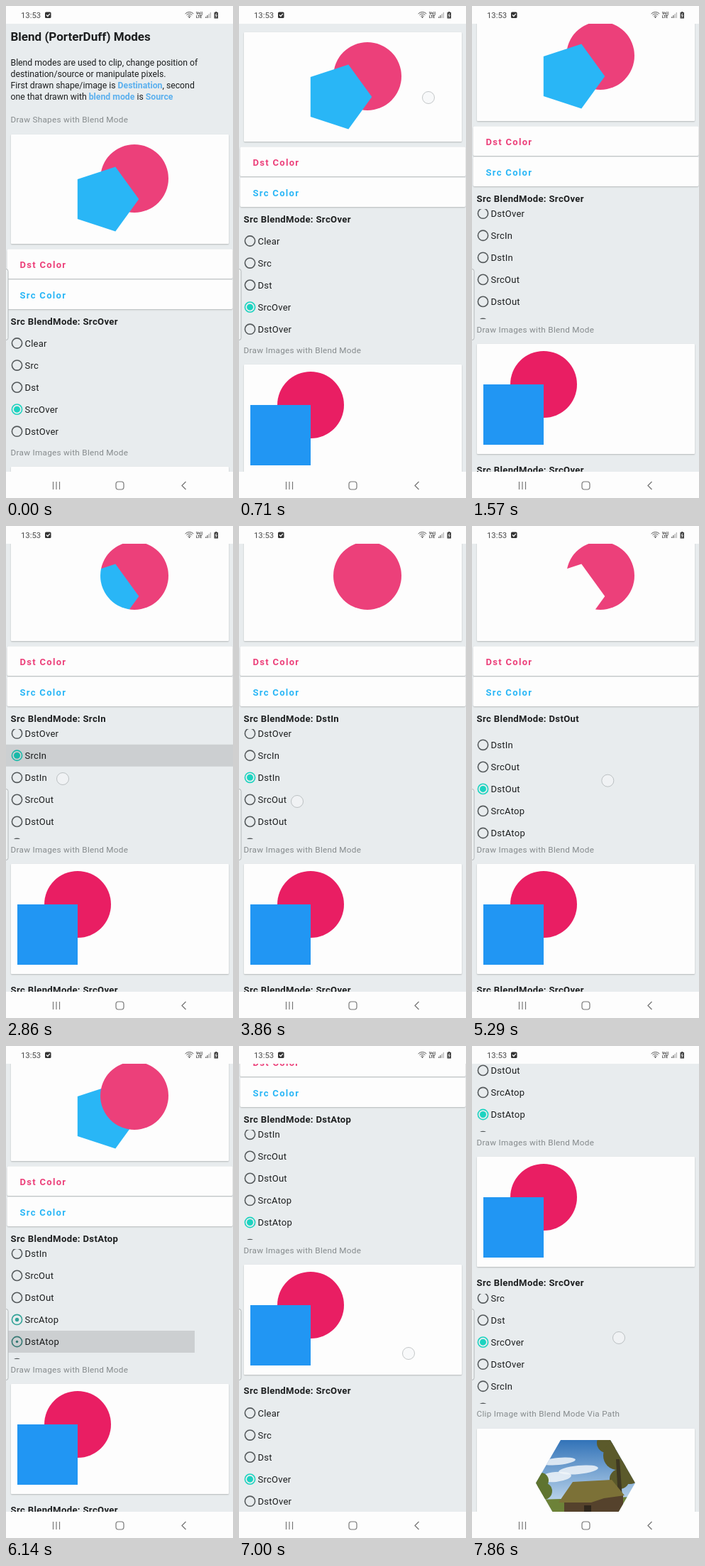
An HTML page with a canvas for the animation above (8 s loop, 320 by 693 pixels).

```html
<!DOCTYPE html>
<html>
<head>
<meta charset="utf-8">
<style>
html, body { margin: 0; width: 100%; height: 100%; overflow: hidden; background: #fff; }
canvas { display: block; width: 320px; height: 693px; }
</style>
</head>
<body>
<canvas id="stage" width="320" height="693"></canvas>
<script>
const ctx = document.getElementById('stage').getContext('2d');
const layer = document.createElement('canvas');
layer.width = 320;
layer.height = 160;
const lctx = layer.getContext('2d');

const LOOP = 8000, FPS = 7;
const INK = '#1c1e1f', PINK = '#ec407a', BLUE = '#29b6f6', LINK = '#5cb0ee';
const MODES = ['Clear', 'Src', 'Dst', 'SrcOver', 'DstOver', 'SrcIn', 'DstIn', 'SrcOut',
  'DstOut', 'SrcAtop', 'DstAtop', 'Xor'];
// Blending only reaches pixels covered by the pentagon.
const COMPOSITE = { SrcOver: 'source-over', SrcIn: 'source-atop', SrcOut: 'xor',
  DstOut: 'destination-out', SrcAtop: 'source-atop', DstAtop: 'destination-over' };

// Keys are in ticks of 1/7 s.
const PAGE_SCROLL = [[3, 0], [4, 58], [5, 144], [6, 170], [7, 173], [46, 173], [47, 205],
  [48, 272], [49, 341], [50, 436], [51, 482], [52, 493]];
const LIST1_SCROLL = [[7, 0], [8, 28], [9, 82], [10, 122], [11, 134], [35, 134], [36, 152],
  [37, 180], [38, 196]];
const LIST2_SCROLL = [[52, 0], [53, 4], [54, 20], [55, 41]];
// [tick, mode, radio progress on first tick]
const TAPS = [[19, 'SrcIn', .4], [21, 'DstIn', .4], [28, 'SrcOut', .4], [31, 'DstOut', 0],
  [40, 'SrcAtop', .4], [43, 'DstAtop', .4]];
// [from, to, x0, y0, x1, y1]
const TOUCHES = [[3, 5, 265, 273, 267, 129], [7, 10, 200, 420, 205, 300],
  [18, 19, 80, 325, 80, 325], [20, 21, 80, 356, 80, 356], [27, 28, 82, 388, 82, 388],
  [30, 31, 83, 420, 83, 420], [35, 38, 190, 400, 192, 338], [39, 40, 82, 387, 82, 387],
  [42, 42, 83, 417, 83, 417], [46, 49, 234, 600, 239, 433], [52, 55, 204, 452, 207, 411]];

function track(keys, k) {
  if (k <= keys[0][0]) return keys[0][1];
  for (let i = 1; i < keys.length; i++) {
    const [a, va] = keys[i - 1], [b, vb] = keys[i];
    if (k <= b) return va + (vb - va) * (k - a) / (b - a);
  }
  return keys[keys.length - 1][1];
}

function text(str, x, y, size, color = INK, weight = 400, spacing = 0) {
  ctx.font = `${weight} ${size}px Roboto, sans-serif`;
  ctx.letterSpacing = spacing + 'px';
  ctx.fillStyle = color;
  ctx.fillText(str, x, y);
  return x + ctx.measureText(str).width;
}

function runs(y, ...parts) {
  parts.reduce((x, part, i) =>
    text(part, x, y, 12.25, i % 2 ? LINK : INK, i % 2 ? 700 : 400), 6.5);
}

function disc(c, x, y, r, color) {
  c.fillStyle = color;
  c.beginPath();
  c.arc(x, y, r, 0, Math.PI * 2);
  c.fill();
}

function polygon(c, cx, cy, r, sides) {
  c.beginPath();
  for (let i = 0; i < sides; i++) {
    const a = i * Math.PI * 2 / sides;
    c.lineTo(cx + r * Math.cos(a), cy + r * Math.sin(a));
  }
  c.closePath();
}

function shape(color, ...pts) {
  ctx.fillStyle = color;
  ctx.beginPath();
  for (let i = 0; i < pts.length; i += 2) ctx.lineTo(pts[i], pts[i + 1]);
  ctx.fill();
}

function line(color, width, ...pts) {
  ctx.strokeStyle = color;
  ctx.lineWidth = width;
  ctx.beginPath();
  for (let i = 0; i < pts.length; i += 2) ctx.lineTo(pts[i], pts[i + 1]);
  ctx.stroke();
}

function panel(x, y, w, h, r) {
  ctx.save();
  ctx.shadowColor = 'rgba(0,0,0,.22)';
  ctx.shadowBlur = 2;
  ctx.shadowOffsetY = 1;
  ctx.fillStyle = '#fdfdfd';
  ctx.beginPath();
  ctx.roundRect(x, y, w, h, r);
  ctx.fill();
  ctx.restore();
}

const caption = (str, y) => text(str, 6.5, y + 4, 11.7, '#858a8c', 400, .3);
const label = (mode, y) => text('Src BlendMode: ' + mode, 6.5, y + 4.5, 13.1, INK, 700, .35);

function colorButton(str, y, color) {
  panel(1.5, y, 318, 41.5, 2);
  text(str, 19.5, y + 26, 13, color, 700, 1.3);
}

function radio(y, p) {
  const mix = (a, b) => Math.round(a + (b - a) * p);
  const color = `rgb(${mix(85, 28)},${mix(90, 211)},${mix(92, 192)})`;
  ctx.strokeStyle = color;
  ctx.lineWidth = 1.6;
  ctx.beginPath();
  ctx.arc(15.5, y, 7.1, 0, Math.PI * 2);
  ctx.stroke();
  if (p > 0) disc(ctx, 15.5, y, 4.5 * p, color);
}

function modeList(top, scroll, selected, ripples) {
  ctx.save();
  ctx.beginPath();
  ctx.rect(0, top, 320, 155);
  ctx.clip();
  MODES.forEach((mode, i) => {
    const y = top + 16 + i * 31.05 - scroll;
    radio(y, selected[mode] || 0);
    text(mode, 26.5, y + 4.8, 13, INK, 400, .25);
    const ripple = ripples[mode];
    if (!ripple) return;
    ctx.fillStyle = `rgba(0,0,0,${ripple.alpha})`;
    ctx.fillRect(0, y - 15.5, ripple.width, 31);
  });
  ctx.restore();
}

function blendCard(mode) {
  panel(7, 181, 307, 154, 1);
  lctx.clearRect(0, 0, 320, 160);
  disc(lctx, 181, 62, 48, PINK);
  if (COMPOSITE[mode]) {
    lctx.globalCompositeOperation = COMPOSITE[mode];
    lctx.fillStyle = BLUE;
    polygon(lctx, 139.5, 91, 47.8, 5);
    lctx.fill();
    lctx.globalCompositeOperation = 'source-over';
  }
  ctx.drawImage(layer, 0, 181);
}

function imageCard() {
  panel(7, 649, 307, 155, 1);
  disc(ctx, 101, 706, 47, '#e91e63');
  ctx.fillStyle = '#2196f3';
  ctx.fillRect(16, 706, 85, 85);
}

function landscapeCard() {
  panel(7, 1032, 307, 155, 1);
  ctx.save();
  polygon(ctx, 160, 1108.5, 70, 6);
  ctx.clip();
  const sky = ctx.createLinearGradient(0, 1048, 0, 1130);
  sky.addColorStop(0, '#3273b8');
  sky.addColorStop(1, '#b4cfe8');
  ctx.fillStyle = sky;
  ctx.fillRect(90, 1045, 140, 125);
  ctx.fillStyle = 'rgba(240,245,250,.85)';
  for (const [x, y, w, h] of [[122, 1078, 24, 5], [150, 1090, 28, 6], [118, 1100, 22, 7]]) {
    ctx.beginPath();
    ctx.ellipse(x, y, w, h, -.1, 0, Math.PI * 2);
    ctx.fill();
  }
  for (const [x, y, r] of [[97, 1105, 11], [101, 1120, 12], [92, 1126, 12]])
    disc(ctx, x, y, r, '#5f7430');
  for (const [x, y, r] of [[190, 1052, 14], [205, 1070, 20], [222, 1092, 18], [208, 1103, 14]])
    disc(ctx, x, y, r, '#5b5a2b');
  shape('#3e3822', 203, 1075, 208, 1075, 212, 1130, 206, 1130);
  shape('#6d8238', 90, 1132, 230, 1128, 230, 1170, 90, 1170);
  shape('#55422c', 130, 1132, 213, 1124, 213, 1170, 130, 1170);
  shape('#7c7137', 122, 1136, 142, 1107, 197, 1104, 215, 1126, 186, 1130, 168, 1136);
  ctx.fillStyle = '#2f271c';
  ctx.fillRect(158, 1140, 10, 30);
  ctx.restore();
}

function page(k) {
  let mode = 'SrcOver', selected = { SrcOver: 1 };
  const ripples = {};
  for (const [start, next, first] of TAPS) {
    const age = k - start;
    if (age < 0) break;
    const p = age ? 1 : first;
    selected = { [mode]: 1 - p, [next]: p };
    mode = next;
    if (age < 3) ripples[next] = { width: age ? 320 : 266, alpha: [.12, .12, .05][age] };
  }
  text('Blend (PorterDuff) Modes', 6.5, 49, 17, INK, 700);
  runs(83.5, 'Blend modes are used to clip, change position of');
  runs(99.5, 'destination/source or manipulate pixels.');
  runs(115.5, 'First drawn shape/image is ', 'Destination', ', second');
  runs(131.5, 'one that drawn with ', 'blend mode', ' is ', 'Source');
  caption('Draw Shapes with Blend Mode', 160);
  blendCard(mode);
  colorButton('Dst Color', 342.5, PINK);
  colorButton('Src Color', 385.5, BLUE);
  label(mode, 444);
  modeList(459, track(LIST1_SCROLL, k), selected, ripples);
  caption('Draw Images with Blend Mode', 629);
  imageCard();
  label('SrcOver', 826.5);
  modeList(842, track(LIST2_SCROLL, k), { SrcOver: 1 }, {});
  caption('Clip Image with Blend Mode Via Path', 1011);
  landscapeCard();
}

function statusBar() {
  ctx.fillStyle = '#fdfdfd';
  ctx.fillRect(0, 0, 320, 25);
  text('13:53', 21, 17, 11.3, '#4a4a4a');
  ctx.fillStyle = '#333';
  ctx.beginPath();
  ctx.roundRect(55, 8.5, 8.5, 8.5, 1.5);
  ctx.fill();
  line('#fff', 1.2, 57, 12.5, 58.8, 14.5, 61.8, 10.8);
  ctx.strokeStyle = '#555';
  ctx.lineWidth = 1;
  for (const r of [3, 5.5, 8]) {
    ctx.beginPath();
    ctx.arc(258.5, 16.5, r, -Math.PI * .76, -Math.PI * .24);
    ctx.stroke();
  }
  disc(ctx, 258.5, 15.8, 1.1, '#555');
  text('Vo))', 268, 12, 5, '#333', 700);
  text('LTE', 268, 17.3, 5, '#333', 700);
  for (let i = 0; i < 4; i++) {
    ctx.fillStyle = i < 2 ? '#777' : '#bbb';
    ctx.fillRect(281 + i * 2.2, 15 - i * 2, 1.4, 2 + i * 2);
  }
  ctx.fillStyle = '#444';
  ctx.fillRect(293.5, 9, 5.5, 8.5);
  ctx.fillRect(295, 8, 2.5, 1);
  line('#fff', .9, 296.8, 10.5, 295.3, 13.3, 297.3, 13.3, 295.8, 16);
}

function navBar() {
  ctx.fillStyle = '#fdfdfd';
  ctx.fillRect(0, 656, 320, 37);
  for (const x of [66.5, 71, 75.5]) line('#777', 1.2, x, 670, x, 681);
  ctx.beginPath();
  ctx.roundRect(155, 670, 11, 11, 3.5);
  ctx.stroke();
  line('#777', 1.3, 253.5, 670, 248, 675.5, 253.5, 681);
}

function edgeHandle() {
  ctx.fillStyle = '#eef1f2';
  ctx.strokeStyle = '#b4b8ba';
  ctx.lineWidth = 1;
  ctx.beginPath();
  ctx.roundRect(-6, 370.5, 9, 100, 3);
  ctx.fill();
  ctx.stroke();
}

function touches(k) {
  for (const [from, to, x0, y0, x1, y1] of TOUCHES) {
    if (k < from || k > to) continue;
    const p = to > from ? (k - from) / (to - from) : 0;
    disc(ctx, x0 + (x1 - x0) * p, y0 + (y1 - y0) * p, 8.5, 'rgba(245,247,248,.6)');
    ctx.strokeStyle = 'rgba(130,135,138,.45)';
    ctx.lineWidth = 1;
    ctx.stroke();
  }
}

function draw(now) {
  const k = Math.floor(((now % LOOP) + 6) * FPS / 1000) % (LOOP * FPS / 1000);
  ctx.fillStyle = '#e8ecee';
  ctx.fillRect(0, 0, 320, 693);
  ctx.save();
  ctx.translate(0, -track(PAGE_SCROLL, k));
  page(k);
  ctx.restore();
  statusBar();
  navBar();
  edgeHandle();
  touches(k);
}

const start = performance.now();
function tick() {
  draw(performance.now() - start);
  requestAnimationFrame(tick);
}
tick();
</script>
</body>
</html>
```
